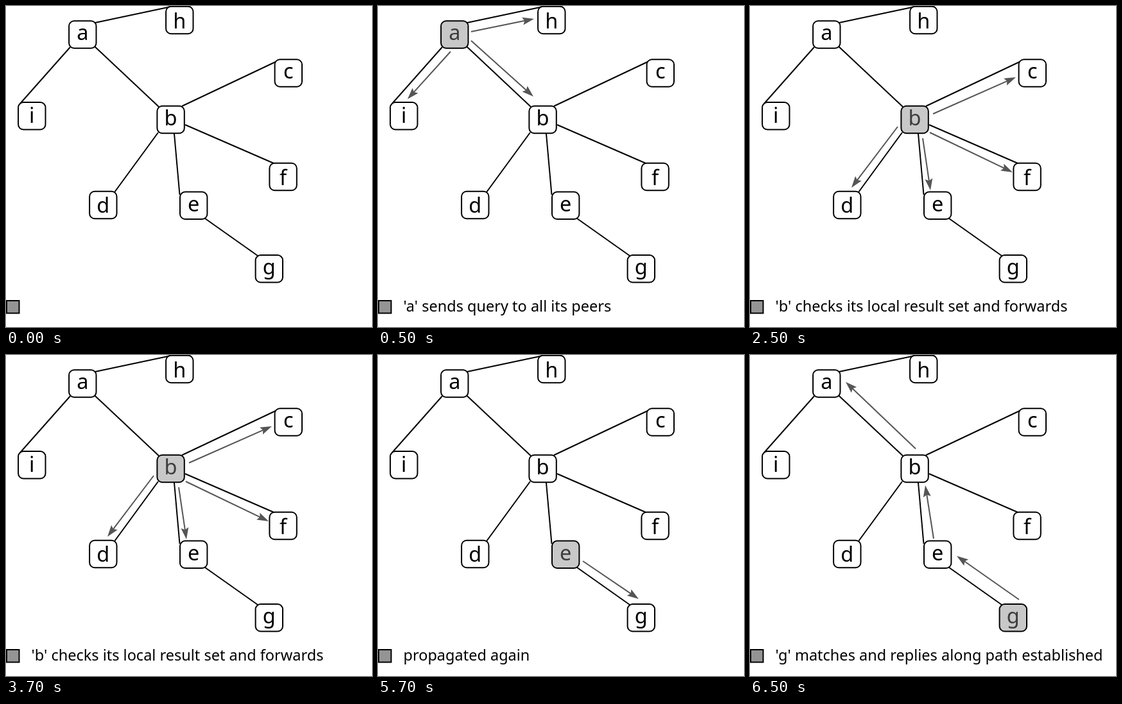
An HTML page with a canvas that plays this animation: 570x500 px, repeating every 8000 ms.

```html
<!DOCTYPE html>
<html lang="en">
<head>
<meta charset="utf-8">
<style>
  html, body { margin: 0; width: 100%; height: 100%; overflow: hidden; background: #fff; }
  canvas { display: block; }
</style>
</head>
<body>
<canvas id="stage" width="570" height="500"></canvas>
<script>
const ctx = document.getElementById('stage').getContext('2d');
const FONT = '"Noto Sans", "Open Sans", sans-serif';
const LOOP = 8000;

// name: box centre x, y, letter baseline
const nodes = {
  a: [119.3, 44.5, 53], h: [270.3, 22, 34.5], c: [439.8, 104.5, 113],
  i: [40.3, 171.3, 181.5], b: [256.6, 177, 186], f: [431.6, 266, 278.5],
  d: [151.3, 310, 322], e: [292.2, 310.8, 319.5], g: [409.8, 409.3, 417.5]
};

const links = [
  [139, 26, 257, 1], [100, 64, 22, 152], [138, 63, 238, 157], [274, 156, 424, 85],
  [279, 185, 417, 245], [237, 197, 169, 290], [262, 199, 270.5, 294], [310, 331, 392, 389]
];

const steps = [
  { at: 0, text: '', arrows: [] },
  { at: 500, node: 'a', text: "'a' sends query to all its peers",
    arrows: [[145, 40, 243, 20], [145, 54, 242, 141], [113, 71, 46, 145]] },
  { at: 2500, node: 'b', text: "'b' checks its local result set and forwards",
    arrows: [[285, 168, 414, 111], [280, 197, 409, 259], [230, 188, 158, 283], [269, 206, 281, 287]] },
  { at: 4500, node: 'e', text: 'propagated again',
    arrows: [[319, 321, 406, 380]] },
  { at: 6500, node: 'g', text: "'g' matches and replies along path established",
    arrows: [[419, 381, 322, 313], [286, 286, 273, 203], [258, 146, 149, 42]] }
];

function line(x1, y1, x2, y2) {
  ctx.beginPath();
  ctx.moveTo(x1, y1);
  ctx.lineTo(x2, y2);
  ctx.stroke();
}

function arrow(x1, y1, x2, y2) {
  const length = Math.hypot(x2 - x1, y2 - y1);
  ctx.save();
  ctx.translate(x1, y1);
  ctx.rotate(Math.atan2(y2 - y1, x2 - x1));
  ctx.strokeStyle = ctx.fillStyle = '#555';
  line(0, 0, length - 14, 0);
  ctx.beginPath();
  ctx.moveTo(length, 0);
  ctx.lineTo(length - 18, -6);
  ctx.lineTo(length - 15, 0);
  ctx.lineTo(length - 18, 6);
  ctx.fill();
  ctx.restore();
}

function node(name, active) {
  const [x, y, baseline] = nodes[name];
  ctx.beginPath();
  ctx.roundRect(x - 21.2, y - 21.2, 42.4, 42.4, 8);
  ctx.fillStyle = active ? '#c8c8c8' : '#fff';
  ctx.fill();
  ctx.stroke();
  ctx.fillStyle = active ? '#3c3c3c' : '#000';
  ctx.fillText(name, x, baseline);
}

function draw(time) {
  const step = steps.findLast(s => s.at <= time);
  ctx.fillStyle = '#fff';
  ctx.fillRect(0, 0, 570, 500);
  ctx.strokeStyle = '#000';
  ctx.lineWidth = 2;
  links.forEach(l => line(...l));

  ctx.font = '32.5px ' + FONT;
  ctx.textAlign = 'center';
  Object.keys(nodes).forEach(name => node(name, name === step.node));
  step.arrows.forEach(a => arrow(...a));

  ctx.fillStyle = '#949494';
  ctx.fillRect(1, 459, 19.5, 19.5);
  ctx.strokeRect(1, 459, 19.5, 19.5);

  ctx.font = '23.5px ' + FONT;
  ctx.textAlign = 'left';
  ctx.fillStyle = '#000';
  ctx.fillText(step.text, 39.5, 476);
}

const start = performance.now();
function tick() {
  draw((performance.now() - start) % LOOP);
  requestAnimationFrame(tick);
}
tick();
</script>
</body>
</html>
```
